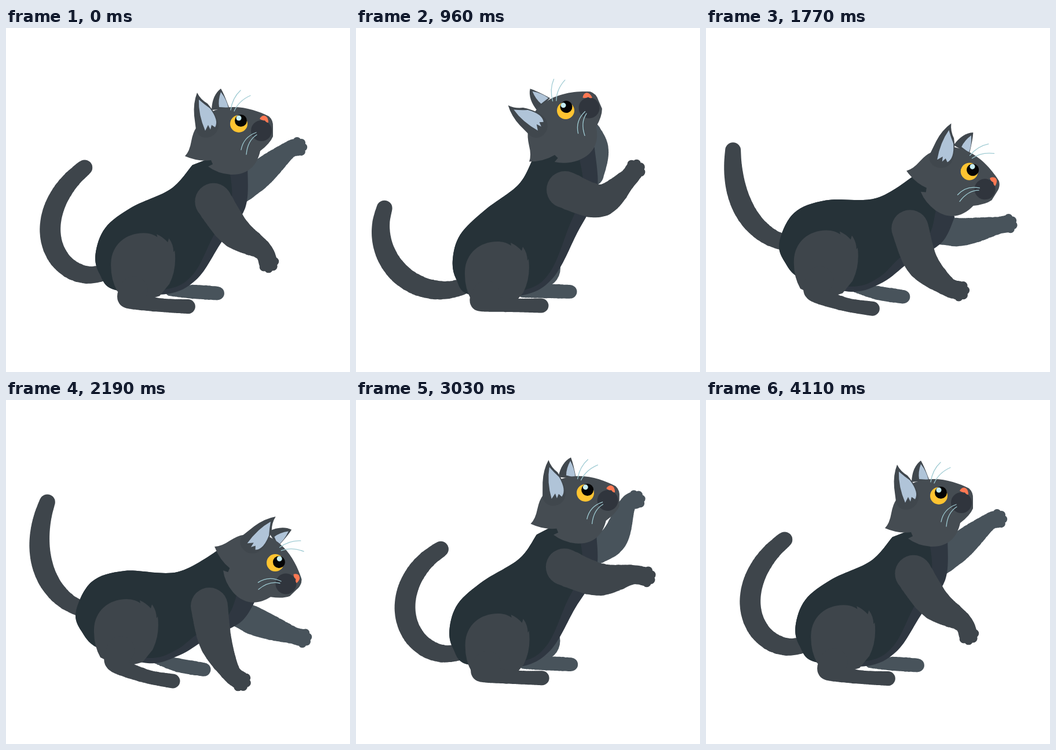
Recreate the animation shown at these times as an HTML page. Size 594 px wide and 596 px high, loop 4.14 s.

```html
<!DOCTYPE html>
<html lang="en">
<head>
<meta charset="utf-8">
<title>Playing cat</title>
<style>
html, body { margin: 0; width: 100%; height: 100%; overflow: hidden; background: #fff; }
svg { display: block; width: 100%; height: 100%; }
.fur { fill: #3e454b; }
.far { fill: #48535b; }
.head { fill: #454c52; }
.ear { fill: #40474d; }
.inner { fill: #b0c4d8; }
.whisker { fill: none; stroke: #9fcbd3; stroke-width: 1.3; stroke-linecap: round; }
</style>
</head>
<body>
<svg viewBox="0 0 594 596">
  <path id="tail" class="fur"/>
  <path id="farArm" class="far"/>
  <circle id="farThigh" class="far" r="35"/>
  <path id="farFoot" class="far"/>
  <path id="chest" fill="#2f3741"/>
  <path id="back" fill="#263238"/>
  <g id="head">
    <g id="backEar">
      <path class="ear" d="M355 142Q356 116 371 105Q377 115 386 140Z"/>
      <path class="inner" d="M371 111Q366 125 368 137L384 138Q381 124 371 111Z"/>
    </g>
    <path class="head" d="M366 141C398 131 432 142 454 153Q462 160 461 172L461 188Q456 200 439 213C434 236 420 255 388 254Q365 252 349 240L357 236L354 229Q332 232 309 222Q317 214 320 196Q323 180 329 172Q345 146 366 141Z"/>
    <g id="frontEar">
      <path class="ear" d="M330 112Q323 130 325 152L328 176Q332 190 346 190Q364 188 367 170Q367 153 348 131Q336 124 330 112Z"/>
      <path class="inner" d="M333 124Q332 150 344 178L349 168L353 176L355 168L361 172Q368 160 352 139Q342 132 333 124Z"/>
    </g>
    <circle cx="441" cy="178" r="18" fill="#30353d"/>
    <path fill="#ff7852" d="M438 157Q442 151 447 152Q453 154 453 164Q449 164 447 160Q442 161 438 157Z"/>
    <circle cx="402" cy="166" r="15" fill="#ffc431"/>
    <circle cx="405.5" cy="160.5" r="10.5" fill="#050505"/>
    <circle cx="402" cy="156" r="4.5" fill="#c5edf3"/>
    <path class="whisker" d="M388 142Q391 121 405 108M394 144Q402 126 422 117M432 181Q410 189 406 211M433 185Q417 195 415 219"/>
  </g>
  <path id="thigh" class="fur" d="M0 0C11 0 18 3 24 7L23 2Q34 7 42 16L44 9Q52 20 52 33L54 30Q58 62 45 88L28 109Q-8 122 -45 101Q-57 80 -56 52C-55 20 -30 0 0 0Z"/>
  <path id="foot" class="fur"/>
  <path id="arm" class="fur"/>
</svg>
<script>
const LOOP = 4140, SPAN = 4110, STEP = 30;
const KEYS = [0, 960, 1440, 2190, 3030, 3630];
const HEAD_KEYS = [0, 600, 960, 1440, 2190, 3030, 3340, 3630];
const el = id => document.getElementById(id);
const rad = deg => deg * Math.PI / 180;

// Crouch (0 upright, 1 low), sideways slide of the legs, lift of the hips
const stance = [[.27, 3, -8], [0, 0, 0], [.6, -7, 4], [1, 0, 0], [.12, 5, 3], [.06, 4, -2]];

// Eye x, eye y, head tilt, ear tilt
const headPose = [
  [402, 166, 0, 0], [369, 141, -18, -9], [362, 143, -23.5, -14], [430, 202, 11, -9],
  [465, 282, 46, 12.6], [396, 161, 1.5, 6], [388, 146, -5, 4], [385, 153, -5, 2.5]
];

// Length, angle at the base, total turn and extra bow
const tailPose = [
  [266, 160, 162, 25], [240, 160, 130, 0], [195, 184, 82, 10],
  [211, 203, 88, 10], [264, 164, 165, 18], [260, 154, 165, 26]
];

// Angles of upper arm, forearm and paw
const armPose = [[55, 34, 63], [18, -38, -50], [53, 13, -5], [80, 64, 42], [20, -8, 7], [46, 18, 31]];
const farArmPose = [[-40, -40, -22], [-84, -115, -110], [-29, -52, -45], [26, 20, 16], [-33, -68, -35], [-38, -58, -38]];

// Each body part as [upright, crouched]; outline runs nape, rump, belly, throat
const body = {
  outline: [
    [304, 230, 280, 272, 222, 316, 180, 358, 167, 401, 173, 435, 198, 462, 288, 463, 341, 432, 382, 355, 416, 285, 412, 207],
    [370, 258, 296, 298, 205, 296, 148, 315, 121, 366, 130, 400, 162, 431, 245, 456, 300, 442, 345, 415, 405, 385, 432, 345]
  ],
  thigh: [[244, 370], [208, 345]],
  farThigh: [[318, 416], [272, 402]],
  foot: [[225, 462, 216, 475, 265, 480, 320, 481], [198, 433, 189, 456, 240, 478, 288, 487]],
  farFoot: [[288, 459, 330, 456, 370, 457], [260, 449, 300, 460, 342, 467]],
  shoulder: [[361, 280], [351, 357]],
  farShoulder: [[406, 253], [393, 365]],
  tailBase: [[185, 448], [125, 360]]
};

// Smooth periodic interpolation through key rows
function sample(rows, t, times = KEYS) {
  const n = rows.length;
  const row = k => rows[(k + n) % n];
  const time = k => times[(k + n) % n] + Math.floor(k / n) * SPAN;
  let i = n - 1;
  while (times[i] > t) i--;
  const t0 = time(i), t1 = time(i + 1), d = t1 - t0, u = (t - t0) / d;
  const ease = u * u * (3 - 2 * u);
  return row(i).map((a, c) => {
    const b = row(i + 1)[c];
    const m0 = (b - row(i - 1)[c]) / (t1 - time(i - 1));
    const m1 = (row(i + 2)[c] - a) / (time(i + 2) - t0);
    return a + (b - a) * ease + d * u * (1 - u) * ((1 - u) * m0 - u * m1);
  });
}

const pairs = list => Array.from({ length: list.length / 2 }, (_, i) => list.slice(2 * i, 2 * i + 2));
const shift = (points, dx, dy) => points.map(([x, y]) => [x + dx, y + dy]);

// Joints of a chain of bones from its root
function chain(root, lengths, angles) {
  const joints = [root];
  lengths.forEach((len, i) => {
    const [x, y] = joints[i], a = rad(angles[i]);
    joints.push([x + len * Math.cos(a), y + len * Math.sin(a)]);
  });
  return joints;
}

const catmull = (a, b, c, d, u) =>
  b + u / 2 * (c - a + u * (2 * a - 5 * b + 4 * c - d + u * (3 * (b - c) + d - a)));

function disc(x, y, r) {
  const arc = dx => `a${r.toFixed(2)} ${r.toFixed(2)} 0 1 0 ${dx.toFixed(2)} 0`;
  return `M${(x - r).toFixed(2)} ${y.toFixed(2)}${arc(2 * r)}${arc(-2 * r)}Z`;
}

// A limb is a dense run of discs along a spline
function limbPath(joints, radii, toes) {
  const end = joints.length - 1;
  const node = i => {
    const k = Math.max(0, Math.min(end, i));
    return [...joints[k], radii[k]];
  };
  let d = '';
  for (let i = 0; i < end; i++) {
    for (let u = 0; u <= 1; u += 1 / 16) {
      d += disc(...[0, 1, 2].map(c => catmull(...[-1, 0, 1, 2].map(k => node(i + k)[c]), u)));
    }
  }
  if (toes) {
    const [x, y, r] = node(end), [px, py] = node(end - 1);
    const dir = Math.atan2(y - py, x - px);
    for (let a = -1.2; a < 1.3; a += 0.8) {
      d += disc(x + 0.7 * r * Math.cos(dir + a), y + 0.7 * r * Math.sin(dir + a), r * 0.47);
    }
  }
  return d;
}

// Smooth curve through points, closed by a straight line
function curve(points) {
  const p = i => points[Math.max(0, Math.min(points.length - 1, i))];
  const handle = (q, a, b, s) => q.map((v, c) => v + s * (b[c] - a[c]) / 6);
  let d = 'M' + points[0];
  for (let i = 0; i < points.length - 1; i++) {
    d += `C${handle(p(i), p(i - 1), p(i + 1), 1)} ${handle(p(i + 1), p(i), p(i + 2), -1)} ${p(i + 1)}`;
  }
  return d;
}

const setPath = (id, d) => el(id).setAttribute('d', d);
const setTransform = (id, value) => el(id).setAttribute('transform', value);

function drawTail(base, t) {
  const [length, start, turn, bow] = sample(tailPose, t), n = 10;
  const angles = Array.from({ length: n }, (_, i) => {
    const s = (i + 0.5) / n;
    return start + turn * s + bow * Math.sin(Math.PI * s);
  });
  const radii = Array.from({ length: n + 1 }, (_, i) => 13.5 + 4.5 * Math.sin(Math.PI * i / n));
  setPath('tail', limbPath(chain(base, Array(n).fill(length / n), angles), radii));
}

function draw(t) {
  const [crouch, slide, lift] = sample(stance, t);
  const part = name => {
    const [up, low] = body[name];
    return pairs(up.map((v, i) => v + (low[i] - v) * crouch));
  };

  const outline = part('outline'), nape = outline[0], throat = outline[11];
  const underHead = 'L' + [(nape[0] + throat[0]) / 2, (nape[1] + throat[1]) / 2 - 22] + 'Z';
  const front = outline.slice(7).map(([x, y], i) => [x + 3 - 9 * i, y - 9]);
  setPath('chest', curve(outline) + underHead);
  setPath('back', curve([...outline.slice(0, 7), ...front]) + underHead);

  setTransform('thigh', `translate(${shift(part('thigh'), slide, lift)})`);
  setTransform('farThigh', `translate(${shift(part('farThigh'), slide, lift)})`);
  setPath('foot', limbPath(shift(part('foot'), slide, 0), [24, 16, 12, 12.5]));
  setPath('farFoot', limbPath(shift(part('farFoot'), slide, 0), [8, 12, 11.5]));

  drawTail(part('tailBase')[0], t);
  setPath('arm', limbPath(chain(part('shoulder')[0], [63, 57, 24], sample(armPose, t)), [32, 28, 17, 16], true));
  setPath('farArm', limbPath(chain(part('farShoulder')[0], [48, 61, 18], sample(farArmPose, t)), [22, 24, 15, 15], true));

  const [x, y, tilt, ear] = sample(headPose, t, HEAD_KEYS);
  setTransform('head', `translate(${x} ${y}) rotate(${tilt}) translate(-402 -166)`);
  setTransform('frontEar', `rotate(${ear} 347 178)`);
  setTransform('backEar', `rotate(${ear * 1.3} 372 138)`);
}

const start = performance.now();
function tick() {
  const t = (performance.now() - start) % LOOP;
  draw(Math.min(Math.floor(t / STEP) * STEP, SPAN - 0.01));
  requestAnimationFrame(tick);
}
tick();
</script>
</body>
</html>
```
